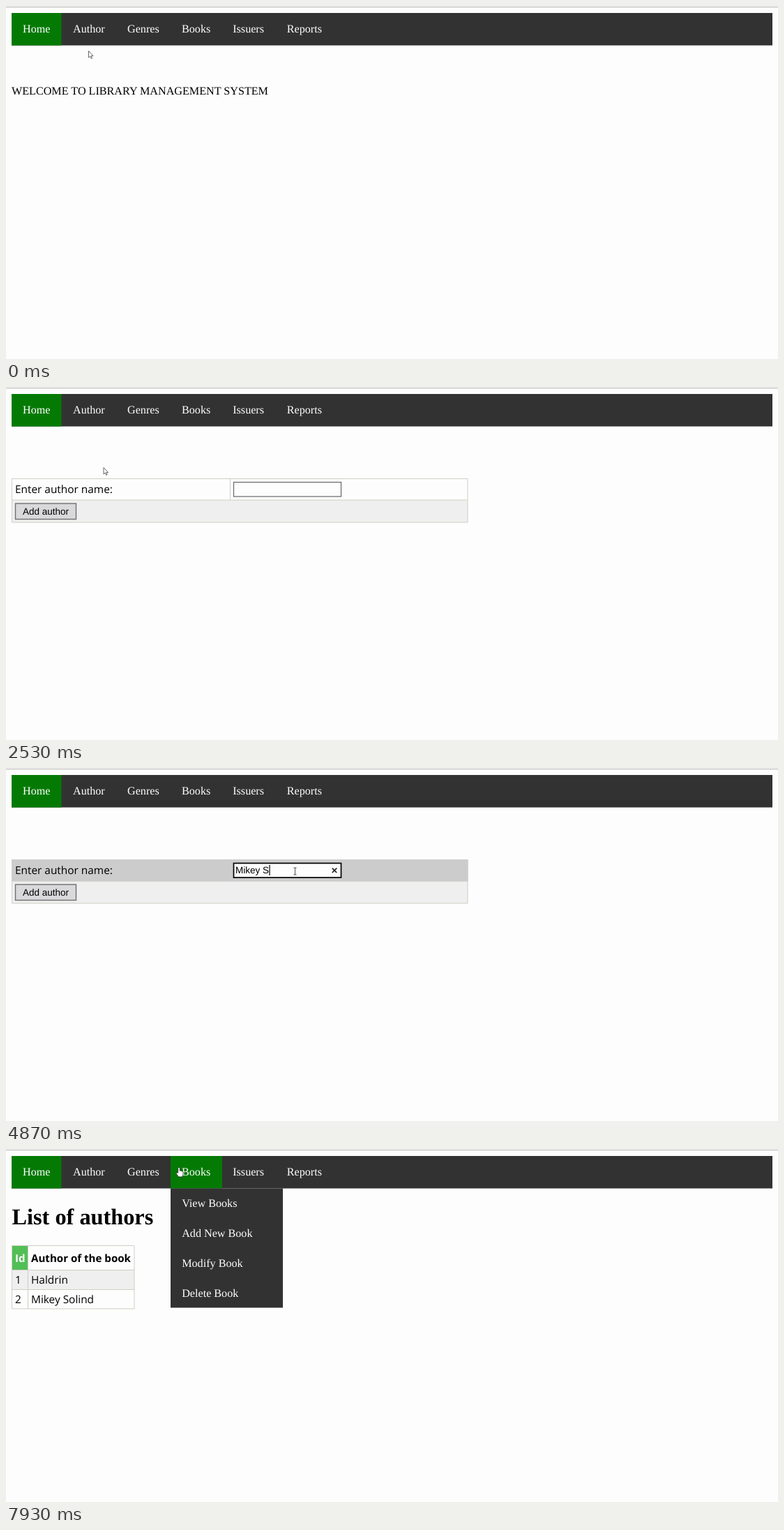
An HTML page for the animation above (8 s loop, 1107 by 506 pixels).

```html
<!DOCTYPE html>
<html lang="en">
<head>
<meta charset="utf-8">
<title>Library management</title>
<style>
  html, body { margin: 0; width: 100%; height: 100%; overflow: hidden; background: #fdfdfd; }
  svg { display: block; width: 100%; height: 100%; }
  text { white-space: pre; text-rendering: geometricPrecision; font-kerning: none; }
  .serif { font: 16.15px "Liberation Serif", serif; }
  .title { font: bold 32.3px "Liberation Serif", serif; }
  .cell { font: 15.4px "Open Sans", sans-serif; }
  .head { font: bold 15.1px "Open Sans", sans-serif; }
  .field { font: 13.5px "Liberation Sans", Arial, sans-serif; }
</style>
</head>
<body>
<svg id="stage" viewBox="0 0 1107 506"></svg>
<script>
const LOOP = 8000;
const DARK = '#323232', GREEN = '#047a04', LINE = '#cfcfc4', STRIPE = '#efefef';
const stage = document.getElementById('stage');

function add(parent, tag, attrs, content) {
  const node = document.createElementNS('http://www.w3.org/2000/svg', tag);
  for (const key in attrs) node.setAttribute(key, attrs[key]);
  if (content) node.textContent = content;
  parent.appendChild(node);
  return node;
}
const group = (parent = stage) => add(parent, 'g', {});
const rect = (parent, x, y, width, height, fill, more) =>
  add(parent, 'rect', { x, y, width, height, fill, ...more });
const label = (parent, x, y, cls, content, fill = '#000') =>
  add(parent, 'text', { x, y, class: cls, fill }, content);
const path = (parent, d, stroke, width = 1, fill = 'none') =>
  add(parent, 'path', { d, stroke, fill, 'stroke-width': width });
const show = (node, on) => node.setAttribute('visibility', on ? 'inherit' : 'hidden');

// Pages
rect(stage, 0, 0, 1107, 506, '#fdfdfd');
rect(stage, 0, 1, 1107, 1, '#b4b4ae');

const home = group();
label(home, 8, 127, 'serif', 'WELCOME TO LIBRARY MANAGEMENT SYSTEM');

const list = group();
label(list, 8.5, 108, 'title', 'List of authors');
rect(list, 8, 138, 23, 35, '#52bf56');
rect(list, 8, 174, 176, 27, STRIPE);
path(list, 'M8.5 201.5V138.5H184V201.5ZM8.5 173.5H184M31.5 138V201', LINE);
label(list, 13, 161.5, 'head', 'Id', '#fff');
label(list, 36, 161.5, 'head', 'Author of the book');
label(list, 13, 193, 'cell', '1');
label(list, 36, 193, 'cell', 'Haldrin');

const WRITER = 'Mikey Solind';
const secondRow = group(list);
path(secondRow, 'M8.5 201V229H184V201M31.5 201V229', LINE);
label(secondRow, 13, 220.5, 'cell', '2');
label(secondRow, 36, 220.5, 'cell', WRITER);

const form = group();
rect(form, 8, 162, 654, 32, STRIPE);
path(form, 'M8.5 131.5H662V194H8.5ZM8.5 162H662M321.5 131V162', LINE);
const rowHover = rect(form, 8, 131, 654.5, 31.5, '#cccccc');
label(form, 13, 152, 'cell', 'Enter author name:');
const box = rect(form, 326.5, 136.5, 154, 20.5, '#fdfdfd');
rect(form, 13.5, 167, 87, 22.5, '#d9d9dc', { stroke: '#707070', 'stroke-width': 1.4 });
label(form, 24, 182.7, 'field', 'Add author');
const typed = label(form, 329, 151, 'field', '');
const caret = rect(form, 329.5, 139, 1.2, 15, '#000');
const clear = path(form, 'M467.8 143.6L474.2 150M474.2 143.6L467.8 150', '#111', 1.5);

// Navigation bar and its menus
rect(stage, 8, 10, 1091, 46.5, DARK);
rect(stage, 8, 10, 71.5, 46.5, GREEN);
const authorLit = rect(stage, 79.5, 10, 78.5, 46.5, GREEN);
const booksLit = rect(stage, 236, 10, 74, 46.5, GREEN);
[['Home', 24], ['Author', 96], ['Genres', 174], ['Books', 252], ['Issuers', 325.2], ['Reports', 402.8]]
  .forEach(([name, x]) => label(stage, x, 38.3, 'serif', name, '#fff'));

function makeMenu(x, items) {
  const node = group();
  rect(node, x, 56.5, 161, 171, DARK);
  const lit = rect(node, x, 56.5, 161, 42.5, GREEN);
  items.forEach((name, i) => label(node, x + 16.2, 83.2 + i * 42.9, 'serif', name, '#fff'));
  return { node, lit };
}
const authorMenu = makeMenu(79.7, ['View Author', 'Add New Author', 'Modify Author', 'Delete Author']);
const booksMenu = makeMenu(236, ['View Books', 'Add New Book', 'Modify Book', 'Delete Book']);

// Pointers, each with its hot spot at 0,0
const pointer = group();
const shapes = {
  arrow: path(pointer, 'M0 0V9.4L2.2 7.5L3.7 10.8L5.1 10.2L3.7 7H6.5Z', '#555', 0.9, '#fff'),
  hand: path(pointer, 'M-1.3 7.6V1Q-1.3-.2 0-.2T1.3 1V4.6Q5 4.4 6 6.4V9.2Q6 11 4.8 13.4H-.6' +
    'L-3.8 8.8Q-3.9 6.4-1.3 7.6Z', '#222', 0.8, '#fff'),
  beam: path(pointer, 'M-2.2-5H2.2M0-5V5M-2.2 5H2.2', '#555', 1)
};

// Pointer stops: time, x, y
const STOPS = [
  [0, 118.5, 64.5], [50, 118.5, 64.5], [210, 119, 40], [470, 129, 98],
  [1240, 129, 98], [1530, 114, 39], [1870, 140.5, 101], [2070, 140, 114.5],
  [2530, 140, 115.5], [3070, 414.5, 148],
  [6970, 414.5, 148], [7480, 285, 46], [7800, 252, 32], [7930, 248, 26.5], [LOOP, 248, 26.5]
];
const KEYS = [3670, 3930, 4100, 4230, 4230, 4470, 4870, 5230, 5370, 5570, 5730, 5930];

function pointerAt(t) {
  const i = STOPS.findIndex(stop => stop[0] > t);
  const [t0, x0, y0] = STOPS[i - 1], [t1, x1, y1] = STOPS[i];
  const k = (t - t0) / (t1 - t0), e = k * k * (3 - 2 * k);
  return [x0 + (x1 - x0) * e, y0 + (y1 - y0) * e];
}

function drawMenu(menu, tab, open, y) {
  const row = Math.floor((y - 59.5) / 42.9);
  show(menu.node, open);
  show(tab, open && y < 56.5);
  show(menu.lit, open && y >= 56.5);
  menu.lit.setAttribute('y', 56.5 + Math.max(0, row) * 42.9);
}

function drawForm(t, x, y) {
  const focused = t >= 3230;
  const count = KEYS.filter(key => key <= t).length;
  show(rowHover, y > 131 && y < 162);
  box.setAttribute('stroke', focused ? '#000' : '#666');
  box.setAttribute('stroke-width', focused ? 1.7 : 1.2);
  typed.textContent = WRITER.slice(0, count);
  show(clear, count > 0);
  const width = count ? typed.getComputedTextLength() : 0;
  caret.setAttribute('x', 329.4 + width);
  caret.setAttribute('opacity', t < 3430 ? 0 : Math.max(0, Math.min(1, (6550 - t) / 150)));
}

function render(t) {
  const [x, y] = pointerAt(t);
  const onForm = t >= 2470 && t < 6670;
  show(home, t < 1000);
  show(list, t >= 1000 && !onForm && t < LOOP);
  show(secondRow, t >= 6670);
  show(form, onForm);
  drawForm(t, x, y);

  const authorOpen = (t < 1000 && (t > 210 || y < 56.5)) ||
    (t > 1240 && t < 2470 && (t > 1530 || y < 56.5));
  const booksOpen = t > 6970 && y < 56.5;
  drawMenu(authorMenu, authorLit, authorOpen, y);
  drawMenu(booksMenu, booksLit, booksOpen, y);

  const loading = t >= 2230 && t < 2470;
  const kind = onForm && x > 326 && y > 136 ? 'beam'
    : (authorOpen || booksOpen) && !loading ? 'hand' : 'arrow';
  for (const name in shapes) show(shapes[name], name === kind);
  pointer.setAttribute('transform', `translate(${x} ${y})`);
}

const start = performance.now();
function tick() {
  render((performance.now() - start) % LOOP);
  requestAnimationFrame(tick);
}
tick();
</script>
</body>
</html>
```
